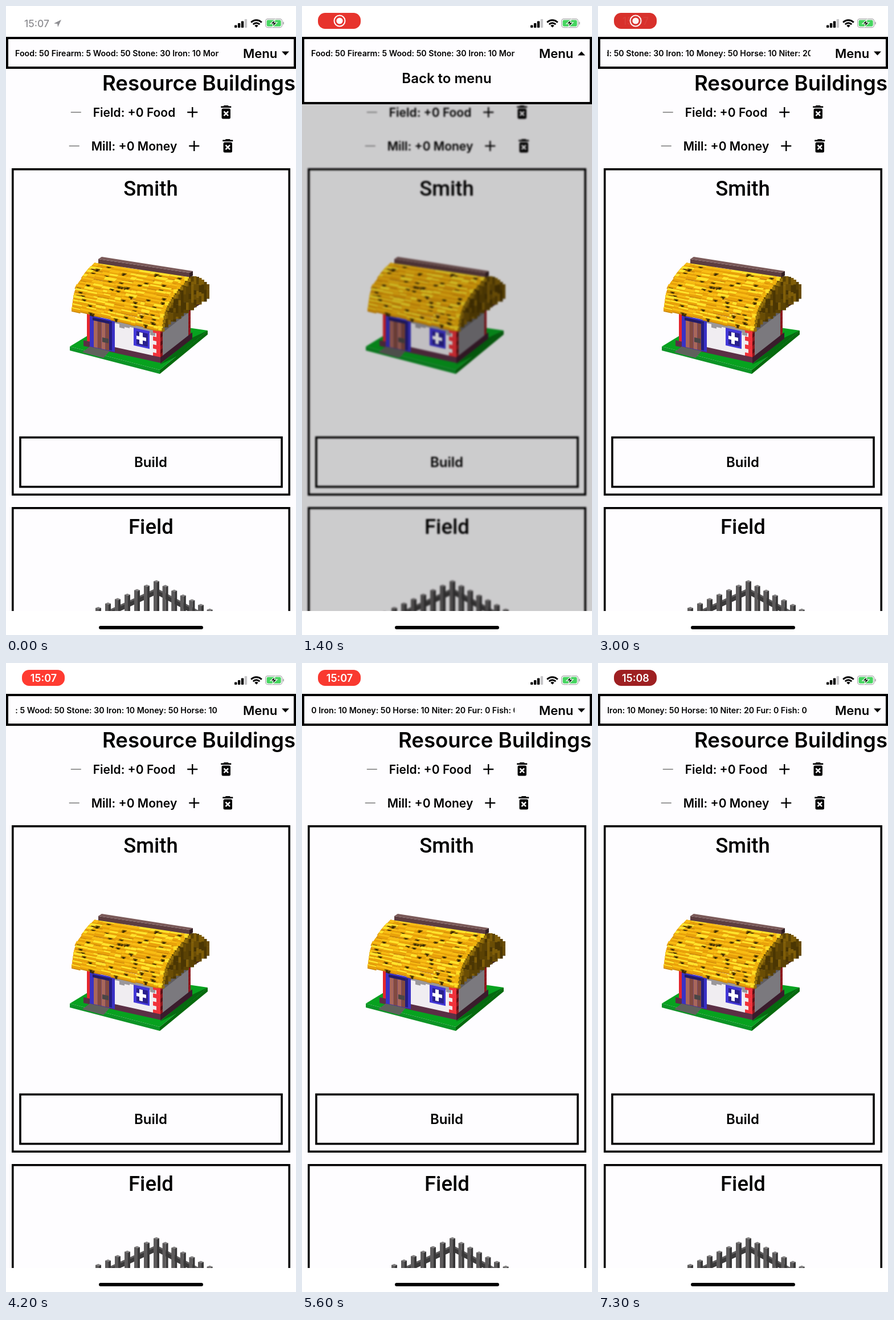
Write an HTML page with a canvas that moves like this. It is 509 px wide and 1101 px high and loops after 7.4 s.

```html
<!DOCTYPE html>
<html lang="en">
<head>
<meta charset="utf-8">
<title>Resource Buildings</title>
<style>
html, body { margin: 0; width: 100%; height: 100%; overflow: hidden; background: #fff; }
canvas { display: block; }
</style>
</head>
<body>
<canvas id="stage" width="509" height="1101"></canvas>
<script>
const W = 509, H = 1101, LOOP = 7400, PAPER = '#fefdff';
const ctx = document.getElementById('stage').getContext('2d');
const STOCK = 'Food: 50 Firearm: 5 Wood: 50 Stone: 30 Iron: 10 Money: 50 Horse: 10 Niter: 20 Fur: 0 Fish: 0';

// ---------- helpers ----------
const clamp = v => Math.max(0, Math.min(1, v));
const ramp = (t, a, b) => { const p = clamp((t - a) / (b - a)); return p * p * (3 - 2 * p); };

function track(keys, t) {
  let [t0, v0] = keys[0];
  for (const [t1, v1] of keys) {
    if (t <= t1) return t1 === t0 ? v1 : v0 + (v1 - v0) * ramp(t, t0, t1);
    [t0, v0] = [t1, v1];
  }
  return v0;
}

function randomizer(seed) {
  return () => (seed = (seed * 16807) % 2147483647) / 2147483647;
}

function rect(g, x, y, w, h, fill) {
  g.fillStyle = fill;
  g.fillRect(x, y, w, h);
}

function poly(g, fill, ...pts) {
  g.beginPath();
  for (let i = 0; i < pts.length; i += 2) g.lineTo(pts[i], pts[i + 1]);
  g.closePath();
  g.fillStyle = fill;
  g.fill();
}

// Upright parallelogram whose top and bottom edges have slope k.
function skew(g, fill, k, x, y, w, h) {
  poly(g, fill, x, y, x + w, y + k * w, x + w, y + k * w + h, x, y + h);
}

function pill(g, x, y, w, h, r, fill) {
  g.beginPath();
  g.roundRect(x, y, w, h, r);
  g.fillStyle = fill;
  g.fill();
}

function arc(g, x, y, r, from = 0, to = 2 * Math.PI) {
  g.beginPath();
  g.arc(x, y, r, from, to);
}

function frame(g, x, y, w, h, lw = 3.6) {
  g.strokeStyle = '#000';
  g.lineWidth = lw;
  g.strokeRect(x + lw / 2, y + lw / 2, w - lw, h - lw);
}

function text(g, str, x, y, size, { align = 'left', weight = 600, face = 'Inter', fill = '#000' } = {}) {
  g.font = `${weight} ${size}px ${face}, sans-serif`;
  g.textAlign = align;
  g.fillStyle = fill;
  g.fillText(str, x, y);
}

// ---------- page content ----------
function bin(g, x, y) {
  rect(g, x + 5, y - 12, 8, 2, '#000');
  rect(g, x, y - 10.6, 18, 2.6, '#000');
  pill(g, x + 1.3, y - 6.6, 15.4, 18, 2.5, '#000');
  g.strokeStyle = PAPER;
  g.lineWidth = 2.5;
  for (const s of [-1, 1]) {
    g.beginPath();
    g.moveTo(x + 5.2, y + 2.3 - 3.8 * s);
    g.lineTo(x + 12.8, y + 2.3 + 3.8 * s);
    g.stroke();
  }
}

function resourceRow(g, label, y) {
  const mid = 225;
  text(g, label, mid, y + 8, 21, { align: 'center' });
  const half = g.measureText(label).width / 2, plus = mid + half + 30;
  rect(g, mid - half - 39, y - 1, 18, 2, '#999');
  rect(g, plus - 9, y - 1.2, 18, 2.4, '#000');
  rect(g, plus - 1.2, y - 9, 2.4, 18, '#000');
  bin(g, plus + 50, y);
}

function house(g) {
  const rnd = randomizer(4217), pick = list => list[Math.floor(rnd() * list.length)];
  const front = (fill, ...box) => skew(g, fill, .22, ...box);
  const side = (fill, ...box) => skew(g, fill, -.78, ...box);

  // lawn
  poly(g, '#07a21f', 112, 596, 196, 545, 354, 568, 270, 637);
  poly(g, '#056a10', 270, 628, 328, 580, 354, 568, 300, 613);
  skew(g, '#0d9426', .26, 112, 596, 158, 7);
  skew(g, '#046a0d', -.82, 270, 637, 84, 7);

  // walls, shade below the thatch, footings
  front('#f0edf1', 142, 534, 129, 54);
  side('#7b797e', 271, 562, 53, 55);
  side('#5f5d62', 271, 562, 53, 13);
  for (let x = 190; x < 256; x += 9) front('#9a979b', x, 527 + (x - 117) * .226, 9, 11 + rnd() * 9);
  front('#e5262d', 142, 534, 6, 53);
  for (let y = 567; y < 614; y += 7) {
    const wide = y % 2;
    const w = wide ? 13 : 7;
    front('#f0323a', 271 - w, y - w * .22, w, 7.4);
    side(wide ? '#8d171d' : '#5d1015', 271, y, 4, 7.4);
    side('#8d171d', 320, y - 36, 4, 7);
  }
  front('#5b2f45', 136, 585, 135, 10);
  side('#3a1c2c', 271, 615, 56, 11);

  // doorstep and door
  poly(g, '#5f615c', 147, 596, 182, 604, 171, 616, 134, 606);
  front('#3a31c4', 147, 541, 44, 55);
  for (let i = 0; i < 4; i++) front(i % 2 ? '#824a40' : '#a9675a', 154 + i * 6.8, 549 + i * 1.5, 6.8, 48);
  front('#221b68', 152, 545, 34, 5);
  front('#241c80', 181, 553, 5, 49);
  front('#4a4646', 169, 580, 11, 8);

  // window
  front('#4338d8', 224, 563, 28, 31);
  front('#29208c', 229, 569, 20, 23);
  front('#fff', 229, 577, 17, 6);
  front('#fff', 234, 571, 6, 20);

  // gable, built of voxel columns below an arch
  skew(g, '#3b1d24', -.6, 316, 527, 26, 10);
  for (let x = 271; x < 355; x += 4.5) {
    const end = 567 - Math.round((x - 270) * .67 / 5) * 5;
    let y = 473 + Math.round(.021 * (x - 326) ** 2);
    while (y < end) {
      const h = Math.min(5 + rnd() * 11, end - y);
      rect(g, x, y, 5, h + .5, pick(['#5b4204', '#6a4d05', '#4b3603', '#7f5d08']));
      y += h;
    }
  }

  thatch(g, rnd);

  // ridge beam
  skew(g, '#5d3d3f', .15, 162, 443, 160, 7.5);
  poly(g, '#7b5a59', 162, 443, 168, 439, 328, 464, 322, 467);
  skew(g, '#321f23', -.5, 322, 467, 6, 8);
}

// Point on the slope: u runs along the ridge, v runs down to the eave.
function slope(u, v) {
  const bulge = 13 * Math.sin(Math.PI * v);
  return [158 - 41 * v + (160 - 5 * v) * u - bulge, 449 + 84 * v + (25 + 10 * v) * u];
}

function thatch(g, rnd) {
  const patch = (fill, u, v, du, dv) =>
    poly(g, fill, ...slope(u, v), ...slope(u + du, v), ...slope(u + du, v + dv), ...slope(u, v + dv));
  const rows = 13, step = 1 / rows;
  for (let r = 0; r < rows; r++) {
    for (let u = -.02 + rnd() * .02; u < .99;) {
      const du = Math.min(.035 + rnd() * .1, 1.01 - u);
      const v = r * step + (rnd() - .5) * .03;
      patch('#c98508', u, v, du, step * 1.25);
      patch('#e9a10a', u, v, du, step);
      patch(rnd() < .5 ? '#ffe32c' : '#f8bd14', u, v, du, step * (.3 + rnd() * .4));
      u += du;
    }
    for (let i = 0; i < 4; i++) {
      const u = rnd() * .94, v = (r + .3 + rnd() * .4) * step;
      patch('#8a6208', u, v, .05, step * .45);
      patch('#3d2b06', u + .015, v + .01, .025, step * .75);
    }
    const [x, y] = slope(1, r * step);
    rect(g, x - 5, y, 8, 7, r % 3 ? '#f0b20d' : '#ffdc25');
    rect(g, x + 1, y + 3, 5, 6, '#94700a');
  }
}

function fence(g) {
  const top = [264, 1005];
  const post = (x, y) => {
    rect(g, x - 5, y + 2, 6, 80, '#5d5b5c');
    rect(g, x + 1, y + 2, 4, 80, '#383738');
    poly(g, '#858384', x - 5, y + 2, x, y, x + 5, y + 2, x + 1, y + 4);
  };
  for (const [dx, dy] of [[-17, 7.8], [15.6, 8.3]]) {
    const k = dy / dx;
    skew(g, '#3b3a3b', k, top[0], top[1] + 14, dx * 7, 11);
    skew(g, '#626061', k, top[0], top[1] + 14, dx * 7, 3);
    for (let i = 7; i > 0; i--) post(top[0] + dx * i, top[1] + dy * i);
  }
  post(...top);
}

function buildPage() {
  const page = document.createElement('canvas');
  page.width = W;
  page.height = H;
  const g = page.getContext('2d');
  const title = { align: 'center', weight: 500, face: 'Roboto' };
  rect(g, 0, 0, W, H, PAPER);
  text(g, 'Resource Buildings', 508, 148, 36.6, { align: 'right' });
  resourceRow(g, 'Field: +0 Food', 186);
  resourceRow(g, 'Mill: +0 Money', 245);
  frame(g, 10, 284, 489, 573);
  text(g, 'Smith', 254, 332, 36.5, title);
  house(g);
  frame(g, 23.2, 753.4, 462.6, 90);
  text(g, 'Build', 254, 807, 24, { align: 'center' });
  frame(g, 10, 877, 489, 260);
  text(g, 'Field', 254.5, 924, 36.5, title);
  fence(g);
  return page;
}

const page = buildPage();

// ---------- animated parts ----------
const SCROLL = [[2450, 0], [3000, -173], [3450, -245], [4200, -116], [4700, -70], [5600, -263], [6700, -276]];

function clipTo(x, y, w, h, paint) {
  ctx.save();
  ctx.beginPath();
  ctx.rect(x, y, w, h);
  ctx.clip();
  paint();
  ctx.restore();
}

function drawPage(open) {
  clipTo(0, 108, W, 951, () => {
    rect(ctx, 0, 0, W, H, PAPER);
    if (open > .01) ctx.filter = `blur(${(1.7 * open).toFixed(2)}px)`;
    ctx.drawImage(page, 0, 0);
    ctx.filter = 'none';
    rect(ctx, 0, 0, W, H, `rgba(0,0,0,${.195 * open})`);
  });
}

function drawHeader(open, t) {
  const h = 56 + 62 * open;
  rect(ctx, 0, 54, W, h, PAPER);
  if (open) clipTo(0, 54, W, h, () => text(ctx, 'Back to menu', 254, 135, 24, { align: 'center' }));
  frame(ctx, 0, 54, W, h, 4);
  clipTo(16, 62, 357, 40, () => text(ctx, STOCK, 16 + track(SCROLL, t), 88, 14.2));

  text(ctx, 'Menu', 416, 91, 22);
  const tip = open > .5 ? -3.5 : 3.5;
  poly(ctx, '#000', 484, 83 - tip, 497, 83 - tip, 490.5, 83 + tip);
}

function drawClock(t) {
  const shown = ramp(t, 450, 700), clock = ramp(t, 2940, 3350);
  ctx.globalAlpha = 1 - shown;
  text(ctx, '15:07', 32, 37, 17.5, { weight: 500, fill: '#8e8e92' });
  poly(ctx, '#8e8e92', 97, 24, 84, 30.5, 90.2, 31.2, 91, 37);

  // pulse: a short dark dip every 2050 ms
  const period = 2050, d = (t - 7300 + 4.5 * period) % period - period / 2;
  const dip = Math.exp(-((d / 210) ** 2));
  const mix = (a, b) => Math.round(a + (b - a) * dip);
  ctx.globalAlpha = shown;
  pill(ctx, 28, 12, 75, 28, 12.5, `rgb(${mix(255, 158)},${mix(59, 32)},${mix(49, 34)})`);

  ctx.globalAlpha = shown * (1 - clock);
  ctx.strokeStyle = ctx.fillStyle = '#fff';
  ctx.lineWidth = 2;
  arc(ctx, 66, 26, 9.5);
  ctx.stroke();
  arc(ctx, 66, 26, 5.6);
  ctx.fill();
  ctx.globalAlpha = shown * clock;
  text(ctx, t < 7000 ? '15:07' : '15:08', 66, 33, 18, { align: 'center', fill: '#fff' });
  ctx.globalAlpha = 1;
}

function drawStatus() {
  for (let i = 0; i < 4; i++) {
    const h = 4.5 + i * 3.5;
    pill(ctx, 401 + i * 5.9, 38 - h, 4.4, h, 1, i < 3 ? '#000' : '#c6c6c8');
  }

  ctx.strokeStyle = '#000';
  for (const [r, lw] of [[12.7, 3], [7.8, 3], [2.2, 4.4]]) {
    ctx.lineWidth = lw;
    arc(ctx, 439.5, 37.5, r, -Math.PI * .76, -Math.PI * .24);
    ctx.stroke();
  }

  ctx.strokeStyle = '#a8a8aa';
  ctx.lineWidth = 1.2;
  ctx.beginPath();
  ctx.roundRect(455.6, 22.6, 29, 15, 4);
  ctx.stroke();
  pill(ctx, 486, 27.5, 1.8, 5, 1, '#a8a8aa');
  pill(ctx, 457.5, 24.5, 25.2, 11.2, 2.4, '#45d45f');
  ctx.strokeStyle = '#e8fbea';
  poly(ctx, '#000', 472.5, 23.5, 464, 31.2, 469.2, 31.2, 467.5, 37, 476, 28.8, 470.8, 28.8);
  ctx.stroke();
}

function draw(t) {
  const open = ramp(t, 950, 1300) * (1 - ramp(t, 1700, 2000));
  rect(ctx, 0, 0, W, H, '#fff');
  drawPage(open);
  drawHeader(open, t);
  drawStatus();
  drawClock(t);
  pill(ctx, 163, 1085, 183, 6, 3, '#000');
}

const start = performance.now();
function tick() {
  const t = (performance.now() - start) % LOOP;
  draw(Math.floor(t / 100) * 100);
  requestAnimationFrame(tick);
}
tick();
</script>
</body>
</html>
```
